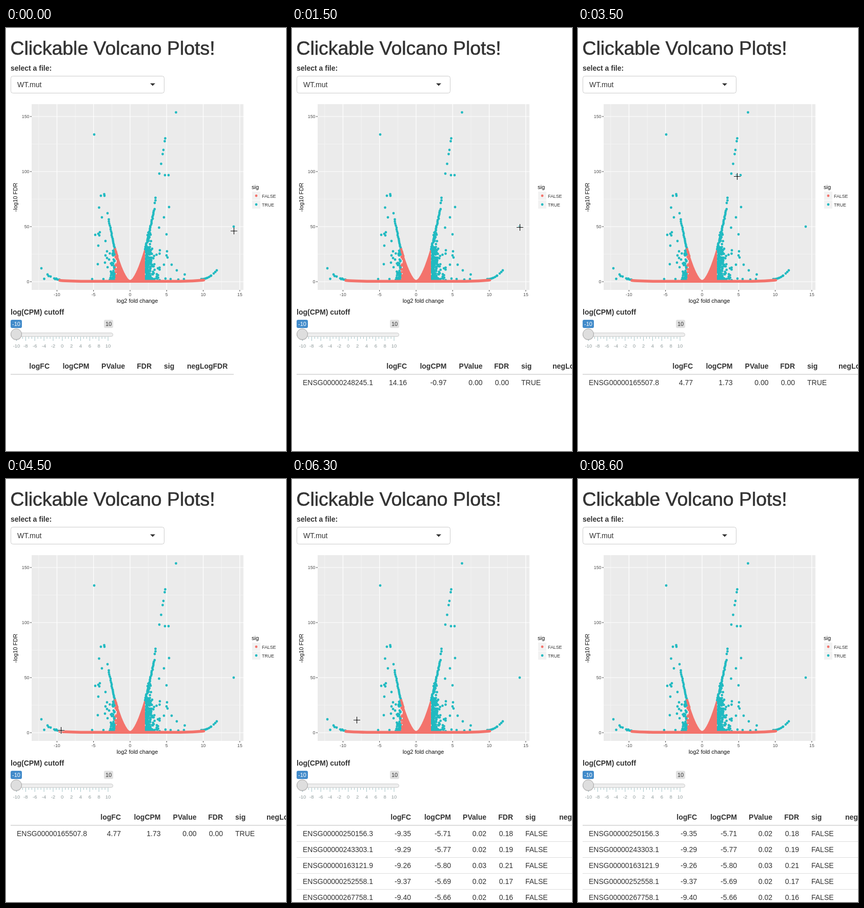
Animation of 546 by 822 pixels, one loop 8700 ms. Source, as an HTML page:

```html
<!DOCTYPE html>
<html lang="en">
<head>
<meta charset="utf-8">
<title>Volcano plots</title>
<style>
  html, body { margin: 0; width: 100%; height: 100%; overflow: hidden; background: #fff; }
  svg { display: block; font-family: "Liberation Sans", Arial, sans-serif; font-size: 14px; fill: #333; }
  .bold { font-weight: bold; }
  .small { font-size: 8.8px; }
  .axis { font-size: 11px; fill: #111; }
</style>
</head>
<body>
<svg id="stage" width="546" height="822" viewBox="0 0 546 822"></svg>
<script>
const LOOP = 8700, RED = '#f3736c', TEAL = '#21bac1';
const stage = document.getElementById('stage');

function add(parent, tag, attrs, text) {
  const el = document.createElementNS('http://www.w3.org/2000/svg', tag);
  for (const key in attrs) el.setAttribute(key, attrs[key]);
  if (text !== undefined) el.textContent = text;
  parent.append(el);
  return el;
}
const group = () => add(stage, 'g', {});
const label = (parent, x, y, text, attrs = {}) => add(parent, 'text', { x, y, ...attrs }, text);
const rect = (parent, x, y, width, height, fill, attrs = {}) =>
  add(parent, 'rect', { x, y, width, height, fill, ...attrs });
const path = (parent, d, stroke, width = 1, attrs = {}) =>
  add(parent, 'path', { d, stroke, 'stroke-width': width, fill: 'none', ...attrs });
const dot = (parent, x, y, fill) => add(parent, 'circle', { cx: x, cy: y, r: 2.4, fill });

let seed = 7;
function random() {
  seed = (seed * 1664525 + 1013904223) % 4294967296;
  return seed / 4294967296;
}
const between = (a, b) => a + (b - a) * random();

function drawForm() {
  const g = group();
  label(g, 8.5, 52, 'Clickable Volcano Plots!',
    { 'font-size': 37.4, stroke: '#333', 'stroke-width': .6 });
  label(g, 9, 83, 'select a file:', { class: 'bold' });
  rect(g, 9.5, 93.5, 299, 33, '#fff', { rx: 4, stroke: '#ccc' });
  label(g, 22, 115, 'WT.mut');
  add(g, 'path', { d: 'M281 107.5H291L286 112.5Z' });

  label(g, 9, 557, 'log(CPM) cutoff', { class: 'bold' });
  rect(g, 9, 567, 22, 16, '#428bca', { rx: 3 });
  label(g, 20, 579, '-10', { 'text-anchor': 'middle', 'font-size': 11, style: 'fill:#fff' });
  rect(g, 191, 567, 18, 16, '#e1e1e1', { rx: 3 });
  label(g, 200, 579, '10', { 'text-anchor': 'middle', 'font-size': 11 });
  for (let i = 0; i <= 30; i++) {
    const major = i % 3 === 0;
    const x = 20.5 + i * 5.95;
    path(g, `M${x.toFixed(1)} 600V${major ? 608 : 604}`, '#a3c3c6');
    if (major) label(g, x, 621, i / 3 * 2 - 10,
      { 'text-anchor': 'middle', 'font-size': 9.5, style: 'fill:#8f9a9b' });
  }
  rect(g, 9.5, 592.5, 199, 7, '#eee', { rx: 3.5, stroke: '#ccc' });
  add(g, 'circle', { cx: 20, cy: 596, r: 11, fill: '#000', opacity: .12 });
  add(g, 'circle', { cx: 20, cy: 595, r: 10.5, fill: '#dedede', stroke: '#a8a8a8' });
}

function drawAxes() {
  const g = group();
  const px = v => 242 + v * 14.26, py = v => 493 - v * 2.14;
  rect(g, 50, 148, 413, 361, '#ebebeb');
  for (let v = -12.5; v <= 15; v += 2.5) {
    const major = v % 5 === 0;
    path(g, `M${px(v)} 148V509`, major ? '#fff' : '#f5f5f5', major ? 1.2 : .8);
    if (!major) continue;
    path(g, `M${px(v)} 509V512`, '#444');
    label(g, px(v), 521, v, { class: 'small', 'text-anchor': 'middle', style: 'fill:#4d4d4d' });
  }
  for (let v = 0; v <= 150; v += 25) {
    const major = v % 50 === 0;
    path(g, `M50 ${py(v)}H463`, major ? '#fff' : '#f5f5f5', major ? 1.2 : .8);
    if (!major) continue;
    path(g, `M47 ${py(v)}H50`, '#444');
    label(g, 45.5, py(v) + 3, v, { class: 'small', 'text-anchor': 'end', style: 'fill:#4d4d4d' });
  }
  label(g, 256, 534, 'log2 fold change', { class: 'axis', 'text-anchor': 'middle' });
  label(g, 0, 0, '-log10 FDR',
    { class: 'axis', 'text-anchor': 'middle', transform: 'translate(22 329) rotate(-90)' });

  label(g, 479, 313, 'sig', { class: 'axis' });
  [['FALSE', RED], ['TRUE', TEAL]].forEach(([name, color], i) => {
    const y = 326 + i * 17;
    rect(g, 480, y - 8, 16, 16, '#f2f2f2');
    dot(g, 488, y, color);
    label(g, 499, y + 4, name, { class: 'small' });
  });
}

const outliers = [
  [331.5, 164], [172, 207], [310.5, 214.5], [309.5, 220], [307, 237], [305.5, 245],
  [302.5, 264], [299, 283], [310, 286], [317, 286], [318, 348], [291.5, 330], [291.5, 335],
  [290, 340], [298.5, 388], [308, 368], [313, 401], [300, 432], [314, 434], [313, 442],
  [315, 446], [308, 460], [323, 460], [333, 471], [348.5, 479], [444, 386],
  [191.5, 323], [192, 326], [185, 326], [181.5, 349], [187, 368], [198, 360], [174, 402],
  [180, 400], [183, 397], [182, 403], [180, 423], [194, 414], [179, 459], [197, 434],
  [193, 456], [194, 442], [201, 450], [69, 467], [74.5, 487.5], [81, 479], [83, 482],
  [87, 483], [168, 488], [347, 488], [336, 489], [321, 488], [311, 487], [190, 488]
];

function drawPoints() {
  const g = group();
  const teal = (x, y) => dot(g, x.toFixed(1), y.toFixed(1), TEAL);
  for (const [x, y] of outliers) teal(x, y);

  // Upper arms of the volcano
  for (let i = 0; i < 34; i++) {
    const t = (i / 33) ** 1.35;
    teal(271.5 + 18 * t + between(-.7, .9), 430 - 78 * t);
  }
  for (let i = 0; i < 20; i++) {
    const t = (i / 19) ** 1.3;
    teal(212.5 - 12.5 * t + between(-.6, .6), 432 - 60 * t);
  }
  // Scatter below the arms, densest near the axis and the threshold
  for (let i = 0; i < 210; i++) {
    const up = random() ** 1.4;
    teal(272.5 + Math.min(27, -Math.log(1 - random()) * (8 - 4 * up)), 490 - up * 66);
  }
  for (let i = 0; i < 14; i++) teal(between(275, 283), between(395, 432));
  for (let i = 0; i < 52; i++) {
    const up = random() ** 1.5;
    teal(212 - Math.min(15, -Math.log(1 - random()) * 4), 490 - up * 58);
  }
  // Curled ends of the base line
  for (const x of [381, 384, 387, 389, 391, 393, 396, 399, 400, 405, 408, 411])
    teal(x, 488 - 17 * ((x - 381) / 30) ** 2);
  for (let x = 94; x <= 106; x += 2) teal(x, 486.5 + (x - 94) * .25 + between(-.6, 1.2));

  path(g, 'M105 490.5Q125 492.3 165 492.3H320Q360 492.3 384 490', RED, 5.6, { 'stroke-linecap': 'round' });
  dot(g, 386, 490, RED);

  const rise = dx => 491 - .284 * Math.abs(dx) ** 1.6;
  let outline = 'M217 494';
  for (let dx = -25; dx <= 28; dx++) outline += `L${242 + dx} ${rise(dx).toFixed(1)}`;
  add(g, 'path', { d: outline + 'L270 494Z', fill: RED, stroke: RED, 'stroke-width': 2, 'stroke-linejoin': 'round' });
  for (let i = 0; i < 20; i++) {
    const x = between(213.5, 218);
    dot(g, x.toFixed(1), between(rise(x - 242), 490).toFixed(1), RED);
  }
  for (let dx = -29; dx < -24; dx++) dot(g, 242 + dx, rise(dx) + 1, RED);
}

const headers = ['logFC', 'logCPM', 'PValue', 'FDR', 'sig', 'negLogFDR'];
const single = [224, 301.5, 371.5, 423, 447, 508];
const tables = [
  { from: 0, columns: [85, 162.5, 232, 284, 308, 353], right: 444, rows: [] },
  { from: 1300, columns: single, right: 546,
    rows: ['ENSG00000248245.1 14.16 -0.97 0.00 0.00 TRUE'] },
  { from: 3300, columns: single, right: 546,
    rows: ['ENSG00000165507.8 4.77 1.73 0.00 0.00 TRUE'] },
  { from: 5100, columns: [232, 310, 379, 431, 455, 521], right: 546,
    rows: [
      'ENSG00000250156.3 -9.35 -5.71 0.02 0.18 FALSE',
      'ENSG00000243303.1 -9.29 -5.77 0.02 0.19 FALSE',
      'ENSG00000163121.9 -9.26 -5.80 0.03 0.21 FALSE',
      'ENSG00000252558.1 -9.37 -5.69 0.02 0.17 FALSE',
      'ENSG00000267758.1 -9.40 -5.66 0.02 0.16 FALSE'
    ] }
];

function drawTable({ columns, right, rows }) {
  const g = group();
  const cell = (i, y, text, attrs) =>
    label(g, columns[i], y, text, { 'text-anchor': i < 4 ? 'end' : 'start', ...attrs });
  headers.forEach((name, i) => cell(i, 662, name, { class: 'bold' }));
  path(g, `M9 673H${right}`, '#ddd', 2);
  rows.forEach((row, r) => {
    const [id, ...values] = row.split(' ');
    const y = 694 + r * 31;
    if (r) path(g, `M9 ${y - 20.5}H${right}`, '#ddd');
    label(g, 21, y, id);
    values.forEach((value, i) => cell(i, y, value));
  });
  return g;
}

function drawCursor() {
  const g = group();
  const cross = 'M-6.5 0H6.5M0 -6.5V6.5';
  path(g, cross, '#f4f4f4', 3, { opacity: .85 });
  path(g, cross, '#000', 1.1);
  return g;
}

// time, x, y
const moves = [
  [0, 444, 394], [300, 444, 394], [800, 444, 387], [2000, 444, 387],
  [2900, 310, 288], [3600, 310, 288], [4400, 107, 488], [4500, 107, 488],
  [4700, 109, 492], [5900, 109, 492], [6700, 143, 444], [8000, 143, 444]
];
const HIDE_AT = 8000;

function cursorAt(t) {
  const i = Math.max(1, moves.findIndex(m => m[0] >= t));
  const [t0, x0, y0] = moves[i - 1], [t1, x1, y1] = moves[i];
  const p = (t - t0) / (t1 - t0), e = p * p * (3 - 2 * p);
  return [Math.round(x0 + (x1 - x0) * e), Math.round(y0 + (y1 - y0) * e)];
}

drawForm();
drawAxes();
drawPoints();
const tableGroups = tables.map(drawTable);
const cursor = drawCursor();

function render() {
  const t = Math.floor(performance.now() % LOOP / 100) * 100;
  const current = tables.filter(table => table.from <= t).length - 1;
  tableGroups.forEach((g, i) => { g.style.display = i === current ? '' : 'none'; });
  const visible = t < HIDE_AT;
  cursor.style.display = visible ? '' : 'none';
  if (visible) {
    const [x, y] = cursorAt(t);
    cursor.setAttribute('transform', `translate(${x + .5} ${y + .5})`);
  }
  requestAnimationFrame(render);
}
render();
</script>
</body>
</html>
```
